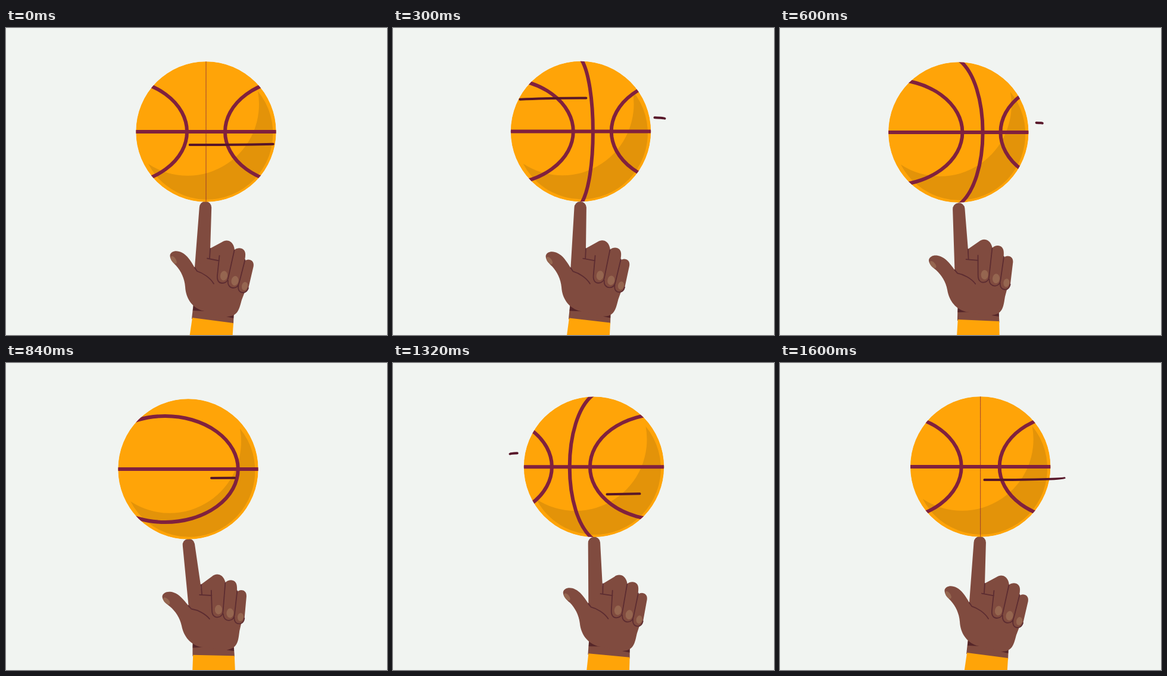
An HTML page that plays this animation: 640 px wide and 515 px high, repeating every 1620 ms.

```html
<!DOCTYPE html>
<html lang="en">
<head>
<meta charset="utf-8">
<title>Spinning basketball</title>
<style>
  html, body { margin: 0; height: 100%; overflow: hidden; background: #f1f4f1; }
  svg { display: block; }
  .skin { fill: #804b3f; }
  .crease { fill: none; stroke: #5c2c31; stroke-width: 1.8; stroke-linecap: round; stroke-linejoin: round; }
  .nail { fill: #956650; }
  .seam { fill: none; stroke: #80213e; stroke-width: 6; }
  #streaks { fill: none; stroke: #571629; stroke-width: 4; stroke-linecap: round; }
</style>
</head>
<body>
<svg width="640" height="515" viewBox="0 0 640 515">
  <clipPath id="disc"><circle r="117.7"/></clipPath>

  <g id="sleeve">
    <path class="skin" d="M315 461L312 488L382 497L382.7 478Z"/>
    <path fill="#552629" d="M315.5 461L313.8 474L334 475ZM370 484L382.2 487L382.5 481Z"/>
    <path fill="#ffa408" d="M313 486L382 495L379 540L305 540Z"/>
  </g>

  <g id="hand">
    <path id="finger" class="skin" d="M316.8 404L324.8 301A10.2 10.2 0 0 1 345.2 301L342.5 390V420L322 420Z"/>
    <path class="skin" d="M317 402C310 390 304 381 296 377C287 372 277 374 275.5 381C275 388 281 394 286 399C294 408 300 420 301 434C302 453 312 468 329 474L372 484C390 484 392 470 396 456L401 443
      C405 442 406.500 439 407.500 435L415.700 400C418 388 405 386 401 391L402 383C404 368 390 367 384 372C382 356 370 354 363 359L342.500 370L342 386L318 400Z"/>
    <path class="skin" d="M391 432C389 440 393 444.500 398.500 444C404 444 406 440 407 436Z"/>
    <path class="crease" d="M343 370L342 386M338 386.500L358 390.500M317 402L321 408C331 411 343 419 349 429
      M358.500 382L355 415C354 424 358 428 363 428C369 428 373 424 373.500 418L383.500 373
      M373 424C372 431 376 436 382 436C388 436 391 431 392 426L401.500 389
      M390.500 432C389 440 393 444 398.500 444C403 444 406 440 407 436"/>
    <g class="nail">
      <ellipse rx="6" ry="8" transform="translate(366 415.5) rotate(8)"/>
      <ellipse rx="6" ry="8" transform="translate(384.5 424) rotate(10)"/>
      <ellipse rx="5" ry="7" transform="translate(401 433) rotate(14)"/>
      <ellipse rx="3.7" ry="7.2" transform="translate(281.700 389) rotate(-35)"/>
    </g>
  </g>

  <g id="ball">
    <g clip-path="url(#disc)">
      <circle r="118" fill="#ffa408"/>
      <path fill="#e39309" d="M87 -68A111 111 0 1 1 -97 54A120 120 0 0 0 87 -68Z"/>
      <ellipse id="left" class="seam" rx="122.500" ry="89"/>
      <ellipse id="right" class="seam" rx="122.500" ry="89"/>
      <path id="middle" class="seam"/>
      <path class="seam" d="M-120 0H120"/>
    </g>
    <path id="streaks"/>
  </g>
</svg>
<script>
const FRAME = 20, FRAMES = 81, LOOP = FRAME * FRAMES, SPIN = 16;
const KEY_TIMES = [0, 300, 600, 840, 1080, 1320];
const TRACKS = {
  ballX: [336, 315.5, 299.8, 306, 323, 337.5],
  ballY: [174, 173.5, 175, 178, 176.4, 174.3],
  wristX: [347.5, 330.5, 333.5, 349, 362, 363],
  turn: [0, 1, 6.3, 8, 6.3, 2.8],
  bend: [0, 0, 0, 2, 3.2, 2],
};
// height, starting frame, length
const STREAKS = [
  [-56, 7.85, 111], [-25, 14.5, 60], [46, 20, 55], [-17.5, 29.7, 60], [15, 39, 39],
  [-56, 49.85, 111], [-25, 56.3, 60], [46, 62.5, 55], [22, 76.05, 140],
];
const REACH = 141, STREAK_SPEED = 34;

const el = id => document.getElementById(id);
const set = (id, name, value) => el(id).setAttribute(name, value);

// Smooth periodic curve through the key values
function sample(values, t) {
  const count = values.length;
  const wrap = i => (i + count) % count;
  const time = i => KEY_TIMES[wrap(i)] + LOOP * Math.floor(i / count);
  const value = i => values[wrap(i)];
  const slope = i => (value(i + 1) - value(i - 1)) / (time(i + 1) - time(i - 1));
  let i = count - 1;
  while (KEY_TIMES[i] > t) i--;
  const span = time(i + 1) - time(i), u = (t - time(i)) / span, v = 1 - u;
  return v * v * ((1 + 2 * u) * value(i) + u * span * slope(i))
       + u * u * ((1 + 2 * v) * value(i + 1) - v * span * slope(i + 1));
}

function streakPath([height, start, length], frame) {
  const clamp = x => Math.max(-REACH, Math.min(REACH, x));
  const y = x => height * (0.87 + 0.13 * Math.sqrt(1 - (x / REACH) ** 2));
  const front = REACH - STREAK_SPEED * ((frame - start + FRAMES) % FRAMES);
  const head = clamp(front), tail = clamp(front + length);
  if (head === tail) return "";
  return `M${tail} ${y(tail)}A${REACH} ${0.13 * Math.abs(height)} 0 0 ${height > 0 ? 1 : 0} ${head} ${y(head)}`;
}

function drawSeams(frame) {
  let step = (SPIN - frame % SPIN) % SPIN;
  if (step > SPIN / 2) step -= SPIN;
  set("left", "cx", -154.5 + 19.3 * step);
  set("right", "cx", 154.5 + 19.3 * step);
  const pull = 20.4 * step * 4 / 3;
  set("middle", "d", `M0 -122C${pull} -82 ${pull} 82 0 122`);
  el("middle").style.strokeWidth = step ? 6 : 1;
  el("middle").style.opacity = step ? 1 : 0.75;
  el("middle").style.display = Math.abs(step) < 6 ? "" : "none";
}

function draw(now) {
  const frame = Math.floor(now / FRAME) % FRAMES;
  const pose = {};
  for (const name in TRACKS) pose[name] = sample(TRACKS[name], frame * FRAME);
  const swing = angle => `translate(${pose.wristX - 347.5} 0) rotate(${-angle} 347.5 490.5)`;
  set("sleeve", "transform", swing(pose.turn * 0.78));
  set("hand", "transform", swing(pose.turn));
  set("finger", "transform", `rotate(${-pose.bend} 330 398)`);
  set("ball", "transform", `translate(${pose.ballX} ${pose.ballY})`);
  drawSeams(frame);
  set("streaks", "d", STREAKS.map(s => streakPath(s, frame)).join(""));
}

const origin = performance.now();
function tick() {
  draw(performance.now() - origin);
  requestAnimationFrame(tick);
}
tick();
</script>
</body>
</html>
```
